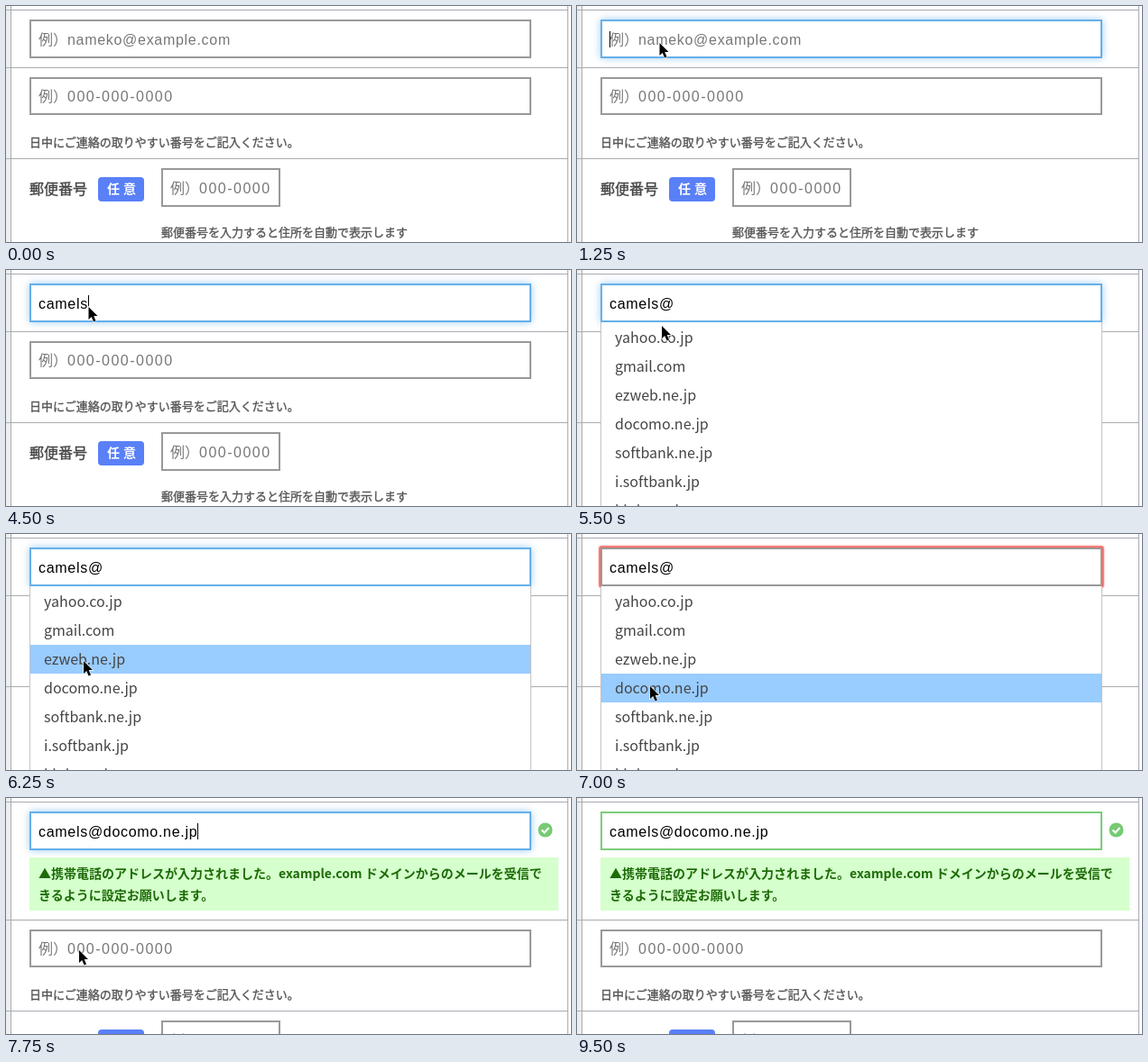
An HTML page for the animation above (10000 ms loop, 626 by 262 pixels).

```html
<!DOCTYPE html>
<html lang="ja">
<meta charset="utf-8">
<style>
  html, body { margin: 0; width: 100%; height: 100%; overflow: hidden; background: #fff; }
  svg { display: block; width: 626px; height: 262px; }
  text { font: 16px "Noto Sans CJK JP", "Noto Sans CJK", sans-serif; fill: #444; white-space: pre; }
  .field { fill: #fff; stroke: #999; stroke-width: 2; }
  .hint { fill: #777; }
  .latin { font-family: "Liberation Sans", sans-serif; letter-spacing: .7px; }
  .digits { letter-spacing: 1.5px; }
  .medium { stroke: currentColor; stroke-width: .35px; color: #444; }
  .help { font-size: 13px; fill: #555; color: #555; }
  .badge { font-size: 14px; font-weight: 700; fill: #fff; }
  #note text { font-size: 14px; font-weight: 700; fill: #1d6b08; }
  #typed { fill: #000; }
  #alert { fill: #ff6961; stroke: #ff6961; stroke-width: 2; filter: drop-shadow(0 0 1px #ff6961); }
  #mail.focus { stroke: #66afe9; filter: drop-shadow(0 0 4px rgba(102, 175, 233, .65)); }
  #mail.valid { stroke: #7bcd78; }
</style>
<svg viewBox="0 0 626 262">
  <path fill="#eee" d="M0 0h5v262H0z"/>
  <path stroke="#aaabb3" d="M0 4.5h622M5.5 0v262M622.5 0v262"/>

  <g id="rest">
    <path stroke="#aaabb3" d="M0 68.5h622M0 169.5h622"/>
    <rect class="field" x="27" y="80" width="554" height="40"/>
    <text class="hint" x="36" y="106">例）<tspan class="latin digits" x="68">000-000-0000</tspan></text>
    <text class="help medium" x="26" y="156">日中にご連絡の取りやすい番号をご記入ください。</text>
    <text class="medium" x="26" y="209">郵便番号</text>
    <rect x="102" y="190" width="51" height="27" rx="4" fill="#5a80f8"/>
    <text class="badge" x="112" y="208">任<tspan x="130">意</tspan></text>
    <rect class="field" x="173" y="181" width="130" height="41"/>
    <text class="hint" x="182" y="208">例）<tspan class="latin digits" x="214">000-0000</tspan></text>
    <text class="help medium" x="172" y="256">郵便番号を入力すると住所を自動で表示します</text>
  </g>

  <rect id="alert" x="25.5" y="14.5" width="557" height="44" rx="1"/>
  <rect id="mail" class="field" x="27" y="16" width="554" height="41"/>
  <text id="hint" class="hint" x="36" y="43">例）<tspan class="latin" x="68">nameko@example.com</tspan></text>
  <text id="typed" class="latin" x="36" y="43"></text>
  <rect id="caret" y="28" width="1" height="18"/>

  <g id="note">
    <path fill="#d5ffcc" d="M26 66h586v59H26z"/>
    <text x="36" y="88.5">▲携帯電話のアドレスが入力されました。example.com ドメインからのメールを受信で</text>
    <text x="36" y="113">きるように設定お願いします。</text>
    <circle cx="597.5" cy="35.5" r="8" fill="#76cb72"/>
    <path d="M593.5 35.5l3 3 5-5.5" fill="none" stroke="#fff" stroke-width="2.2"/>
  </g>

  <g id="menu">
    <path fill="#fff" stroke="#c4c4c4" d="M26.5 58V270H581.5V58"/>
    <rect id="active" x="27" width="554" height="32" fill="#9cf"/>
  </g>

  <path id="pointer" d="M0 0V14l3.2-3 2.4 5.4 2.4-1-2.3-5.3H10Z" stroke="#fff" stroke-width="1.2" paint-order="stroke"/>
</svg>
<script>
  const LOOP = 10000, STEP = 250, BLINK = 500, ROW = 32, MENU_TOP = 59;
  const USER = 'camels', DOMAIN = 'docomo.ne.jp';
  const FOCUS = 1250, OPEN = 4750, PRESS = 7000, PICK = 7500, NOTE = 7750, LEAVE = 9500;
  const keys = [2000, 2250, 2500, 3000, 3250, 3500, OPEN];
  const path = [[250, 106, 33], [750, 91.5, 41], [5250, 91.5, 41], [5500, 94, 62],
    [6250, 86, 141], [6500, 81, 169], [8500, 81, 169], [8750, 58, 165]];

  const $ = id => document.getElementById(id);
  const show = (id, on) => $(id).style.display = on ? '' : 'none';
  const within = (t, start, end) => t >= start && t < end;

  function pointerAt(t) {
    const i = path.findIndex(p => p[0] >= t);
    if (i < 1) return path[0].slice(1);
    const [t0, x0, y0] = path[i - 1], [t1, x1, y1] = path[i];
    const f = (t - t0) / (t1 - t0);
    return [x0 + (x1 - x0) * f, y0 + (y1 - y0) * f];
  }

  ['yahoo.co.jp', 'gmail.com', 'ezweb.ne.jp', DOMAIN, 'softbank.ne.jp', 'i.softbank.jp', 'i.jphone.jp'].forEach((name, i) => {
    const row = document.createElementNS('http://www.w3.org/2000/svg', 'text');
    row.setAttribute('x', 42);
    row.setAttribute('y', MENU_TOP + ROW * i + 22);
    row.textContent = name;
    $('menu').append(row);
  });

  function draw() {
    const t = Math.floor(performance.now() % LOOP / STEP) * STEP;
    const focused = within(t, FOCUS, PRESS) || within(t, PICK, LEAVE);

    const count = keys.filter(k => k <= t).length;
    $('typed').textContent = `${USER}@`.slice(0, count) + (t >= PICK ? DOMAIN : '');
    show('hint', !count);

    // The caret restarts its blink at every input.
    const lastInput = Math.max(...[FOCUS, ...keys, PICK].filter(k => k <= t));
    show('caret', focused && Math.floor((t - lastInput) / BLINK) % 2 === 0);
    $('caret').setAttribute('x', 36 + Math.round(count && $('typed').getComputedTextLength()));

    $('mail').setAttribute('class', `field ${focused ? 'focus' : t >= LEAVE ? 'valid' : ''}`);
    show('alert', within(t, PRESS, PICK));
    show('note', t >= NOTE);
    $('rest').setAttribute('transform', `translate(0 ${t >= NOTE ? 67 : 0})`);

    const [x, y] = pointerAt(t);
    show('pointer', within(t, path[0][0], path.at(-1)[0] + STEP));
    $('pointer').setAttribute('transform', `translate(${x} ${y})`);

    const row = Math.floor((y - MENU_TOP - 4) / ROW);
    show('menu', within(t, OPEN, PICK));
    show('active', row >= 0);
    $('active').setAttribute('y', MENU_TOP + ROW * row);
    requestAnimationFrame(draw);
  }
  draw();
</script>
</html>
```
